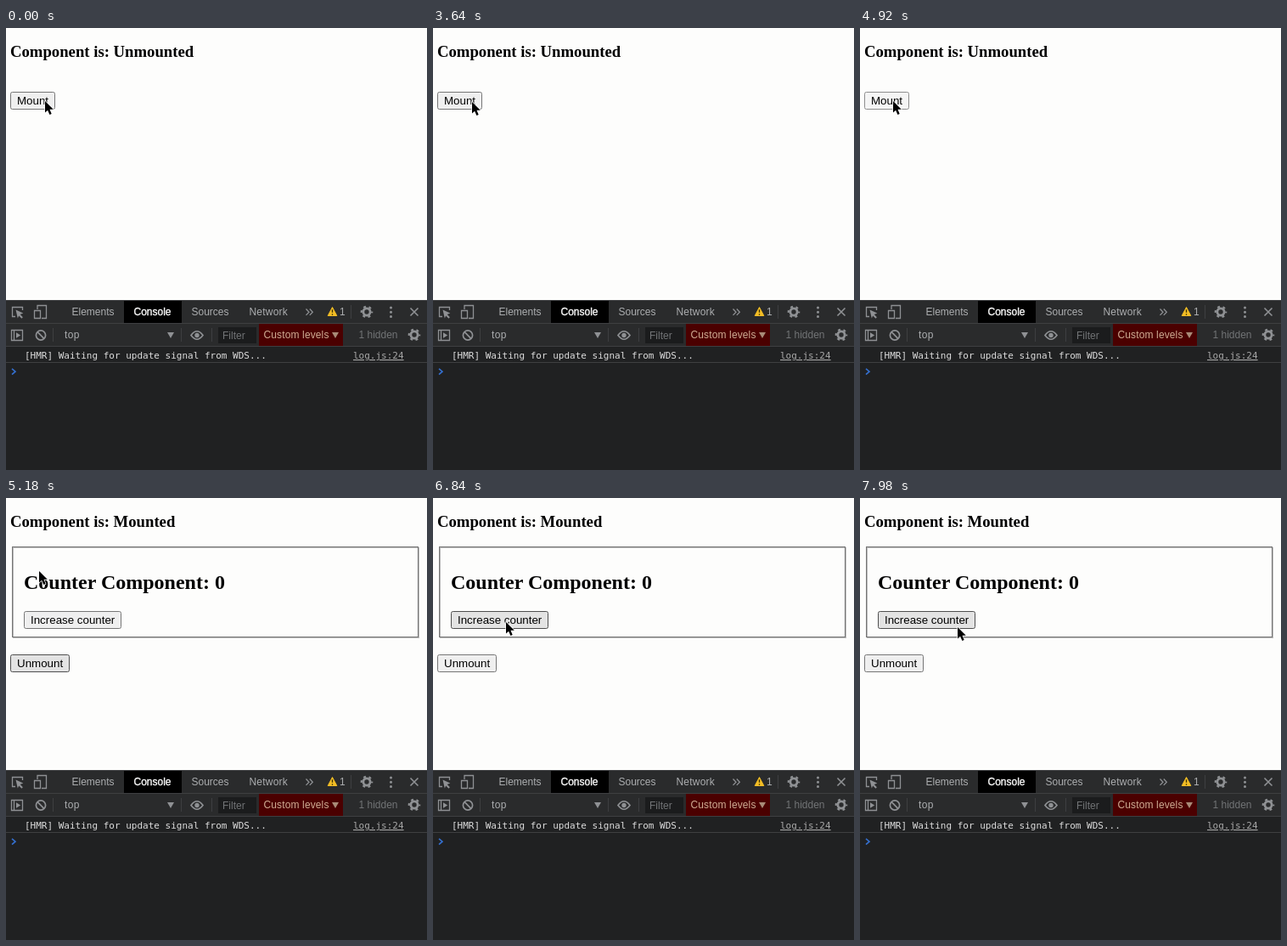
Write an HTML page that moves like this. It is 496 by 520 pixels and loops after 8000 ms.

```html
<!DOCTYPE html>
<html lang="en">
<head>
<meta charset="utf-8">
<title>Mount and unmount</title>
<style>
  html, body { margin: 0; width: 100%; height: 100%; overflow: hidden; background: #fdfdfc; }
  svg { display: block; width: 496px; height: 520px; }
  text { white-space: pre; }
  .serif { font: bold 18.72px "Liberation Serif", Times, serif; }
  .big { font-size: 24px; }
  .btn text { font: 13.333px "Liberation Sans", Arial, sans-serif; fill: #000; }
  .ui { font: 12px "Liberation Sans", Arial, sans-serif; fill: #acaeb0; }
  .dim { fill: #727476; }
  .mono { font: 11px "DejaVu Sans Mono", Menlo, monospace; fill: #dedede; }
  .icon { fill: none; stroke: #8f9194; stroke-width: 1.3; }
  .solid { fill: #8f9194; }
  .line { stroke: #3e3f41; }
</style>
</head>
<body>
<svg viewBox="0 0 496 520">
  <defs>
    <g id="gear">
      <circle r="4.1" fill="none" stroke="#8f9194" stroke-width="2.8"/>
      <circle r="6.2" fill="none" stroke="#8f9194" stroke-width="2.2" stroke-dasharray="2.8 3.693" stroke-dashoffset="1.4"/>
    </g>
  </defs>

  <rect width="496" height="320" fill="#fdfdfc"/>
  <text id="title" class="serif" x="5" y="34"></text>

  <g id="mountBtn" class="btn">
    <rect x="5.5" y="75.5" width="52" height="20" rx="2"/>
    <text x="13" y="90">Mount</text>
  </g>

  <g id="mounted">
    <g fill="none">
      <rect x="8.5" y="58.5" width="478" height="106" stroke="#b8b8b8"/>
      <rect x="7.5" y="57.5" width="478" height="106" stroke="#767676"/>
    </g>
    <text class="serif big" x="21" y="107">Counter Component: 0</text>
    <g id="countBtn" class="btn">
      <rect x="21.5" y="133.5" width="114" height="20" rx="2"/>
      <text x="29" y="148">Increase counter</text>
    </g>
    <g id="unmountBtn" class="btn">
      <rect x="5.5" y="184.5" width="69" height="20" rx="2"/>
      <text x="13" y="199">Unmount</text>
    </g>
  </g>

  <!-- developer tools -->
  <rect y="320" width="496" height="200" fill="#202122"/>
  <rect y="320" width="496" height="55" fill="#2a2b2c"/>
  <rect x="139" y="321" width="68" height="26" fill="#000"/>
  <path class="line" d="M0 320.5H496M0 347.5H496M0 374.5H496M0 393.5H496M55.5 353V369M206.5 353V369M242.5 353V369M406.5 326V342"/>

  <g class="ui">
    <text x="77.5" y="338">Elements</text>
    <text x="150.5" y="338" fill="#fff" stroke="#fff" stroke-width=".35">Console</text>
    <text x="218.5" y="338">Sources</text>
    <text x="286.5" y="338" letter-spacing=".2">Network</text>
    <text x="393" y="338">1</text>
    <text x="69" y="365" letter-spacing=".4">top</text>
    <text class="dim" x="415.5" y="365">1 hidden</text>
  </g>
  <rect x="250" y="352" width="45" height="19" fill="#1b1c1d"/>
  <text class="ui dim" x="255" y="366">Filter</text>
  <rect x="298" y="348" width="99" height="26" fill="#4b0000"/>
  <text class="ui" x="303.5" y="365" letter-spacing=".13" style="fill:#cfad94">Custom levels</text>
  <path fill="#a88b78" d="M384 358h8l-4 7z"/>
  <path class="solid" d="M190 358h8l-4 7z"/>

  <!-- toolbar icons -->
  <g class="icon">
    <path d="M11 339.5H7.5V328.5H19.5V332"/>
    <path d="M37 331V326.5H47.5V341.5H42M33.5 332.5H40.5V341.5H33.5Z"/>
    <path d="M353.5 330.5l3.5 3.7-3.5 3.7M357.8 330.5l3.5 3.7-3.5 3.7"/>
    <path d="M476.5 329.5l9 9M485.5 329.5l-9 9" stroke-width="1.6"/>
    <path d="M6.5 355.5H19.5V367.5H6.5ZM9.5 355.5V367.5"/>
    <circle cx="41" cy="361.5" r="5.6" stroke-width="1.7"/>
    <path d="M37.2 357.7l7.6 7.6" stroke-width="1.7"/>
    <path d="M218 361.5Q225 352 232 361.5Q225 371 218 361.5Z" stroke-width="1.7"/>
  </g>
  <g class="solid">
    <path d="M11.5 331.5l8.8 4-3.6 1.4 3.2 3.3-1.5 1.5-3.2-3.3-1.4 3Z"/>
    <path d="M12 358.3v6.4l5.2-3.2z"/>
    <circle cx="225" cy="361.5" r="2.7"/>
    <circle cx="453.5" cy="329" r="1.5"/>
    <circle cx="453.5" cy="334.3" r="1.5"/>
    <circle cx="453.5" cy="339.6" r="1.5"/>
  </g>
  <path d="M384.5 328.5l5.3 10h-10.6z" fill="#f3bd25" stroke="#f3bd25" stroke-linejoin="round"/>
  <path d="M384.5 331.2v3.6M384.5 336.2v1.5" stroke="#3a3000" stroke-width="1.3"/>
  <use href="#gear" x="425" y="334"/>
  <use href="#gear" x="481" y="361"/>

  <text class="mono" x="22" y="389">[HMR] Waiting for update signal from WDS...</text>
  <text class="mono" x="409" y="389" text-decoration="underline" style="fill:#a8a8a8">log.js:24</text>
  <path d="M7 400.8l4 3.4-4 3.4" fill="none" stroke="#3470d0" stroke-width="1.6"/>

  <path id="cursor" d="M0 0V13.6L3.1 10.7 5.4 16 7.7 15 5.5 9.8H9.8Z" fill="#000" stroke="#fff" stroke-width="1.4" paint-order="stroke" stroke-linejoin="round"/>
</svg>
<script>
  const LOOP = 8000, HOVER = 3680, PRESS = 4880, MOUNT = 5160, LEAVE = 6700;

  // time, x, y of the pointer tip
  const path = [
    [0, 46, 86], [3620, 46, 86], [3640, 46, 87], [3920, 44, 96],
    [4200, 44, 96], [4760, 39, 86], [LEAVE, 39, 86], [6840, 86, 146],
    [7120, 88, 147], [7280, 88, 147], [7560, 104, 186], [7940, 115, 152], [LOOP, 115, 152]
  ];

  // fill and border of each button state
  const looks = {
    normal: ["#efefef", "#767676"],
    hover: ["#e3e3e3", "#4f4f4f"],
    active: ["#f5f5f5", "#8d8d8d"]
  };

  const $ = id => document.getElementById(id);
  const show = (id, on) => { $(id).style.display = on ? "" : "none"; };

  function paint(id, state) {
    const box = $(id).firstElementChild;
    const [fill, border] = looks[state];
    box.setAttribute("fill", fill);
    box.setAttribute("stroke", border);
  }

  function pointer(t) {
    const i = path.findIndex(p => p[0] > t);
    const [t0, x0, y0] = path[i - 1], [t1, x1, y1] = path[i];
    const k = (t - t0) / (t1 - t0);
    return [x0 + (x1 - x0) * k, y0 + (y1 - y0) * k];
  }

  function draw(t) {
    const mounted = t >= MOUNT;
    const [x, y] = pointer(t);
    const overCount = x >= 21 && x <= 136 && y >= 133 && y <= 154;

    $("title").textContent = "Component is: " + (mounted ? "Mounted" : "Unmounted");
    show("mounted", mounted);
    show("mountBtn", !mounted);
    paint("mountBtn", t < HOVER ? "normal" : t < PRESS ? "hover" : "active");
    // the swapped button keeps its hover look until the pointer moves
    paint("unmountBtn", t < LEAVE ? "hover" : "normal");
    paint("countBtn", overCount ? "hover" : "normal");
    $("cursor").setAttribute("transform", `translate(${Math.round(x)} ${Math.round(y)})`);
  }

  const start = performance.now();
  function tick() {
    draw((performance.now() - start) % LOOP);
    requestAnimationFrame(tick);
  }
  tick();
</script>
</body>
</html>
```
